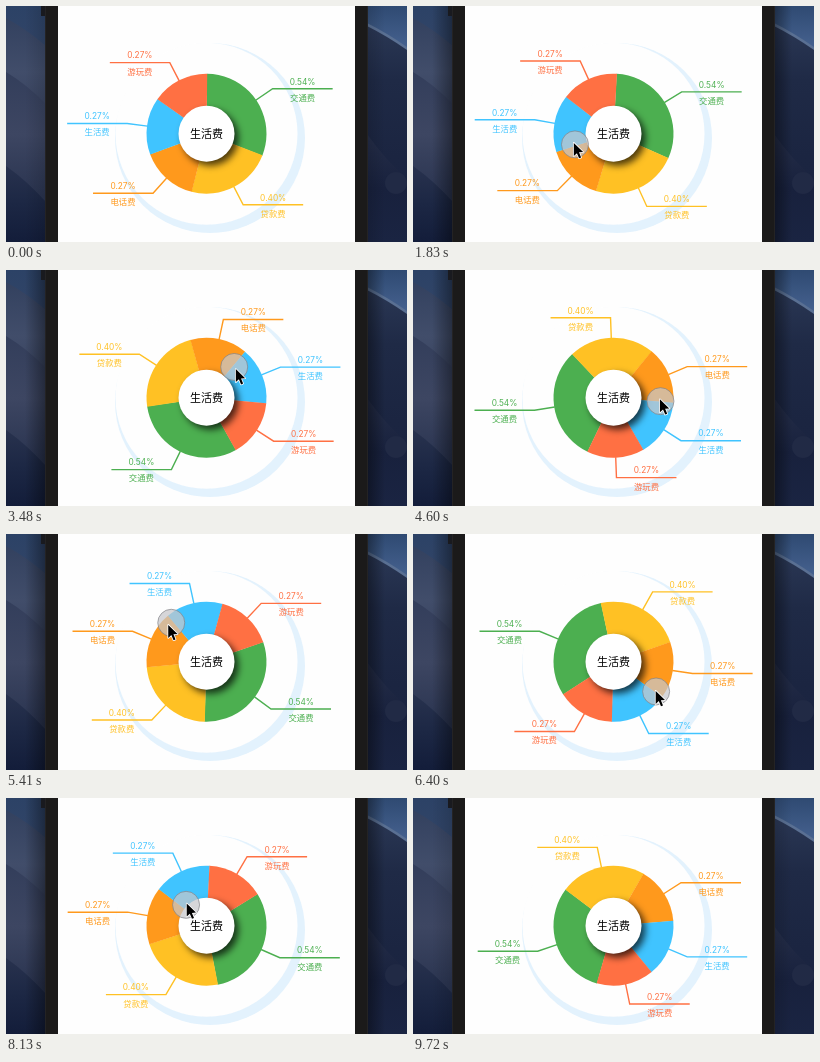
These frames come from a looping animation (401x236 px, 9780 ms). An HTML page with a canvas:

```html
<!DOCTYPE html>
<html lang="zh">
<head>
<meta charset="utf-8">
<style>
  html, body { margin: 0; width: 100%; height: 100%; overflow: hidden; background: #1b2338; }
  canvas { display: block; width: 401px; height: 236px; }
</style>
</head>
<body>
<canvas id="stage" width="401" height="236"></canvas>
<script>
const ctx = document.getElementById('stage').getContext('2d');
const W = 401, H = 236, LOOP = 9780;
const CX = 200.5, CY = 127.7, RADIUS = 60, ELBOW = 80, ARM = 60;
const RAD = Math.PI / 180;
const PRESS = 1530, RELEASE = 8820, BLUR = 9720;
const CJK = '"Noto Sans CJK SC", "Noto Sans CJK", sans-serif';

const slices = [
  { name: '交通费', share: 4, label: '0.54%', color: '#4caf50' },
  { name: '贷款费', share: 3, label: '0.40%', color: '#ffc124' },
  { name: '电话费', share: 2, label: '0.27%', color: '#ff991c' },
  { name: '生活费', share: 2, label: '0.27%', color: '#40c4ff' },
  { name: '游玩费', share: 2, label: '0.27%', color: '#ff7043' }
];
const total = slices.reduce((sum, s) => sum + s.share, 0);

// Time in ms, wheel angle in degrees
const spin = [
  [0, 270.4], [1775, 270.4], [2630, 568], [3480, 780.4], [3770, 838], [3950, 852],
  [4315, 852], [5410, 701], [6280, 523], [6400, 507], [6810, 497],
  [7045, 497], [8130, 688], [8820, 826], [LOOP, 826]
];
// Time in ms, distance of the finger from the centre
const reach = [
  [0, 40], [1775, 40], [2630, 38.6], [3480, 41.4], [3950, 46], [4315, 46],
  [5410, 52.5], [6400, 52], [6810, 50], [7045, 50], [8130, 29.2], [8820, 39], [LOOP, 39]
];
// Time in ms, degrees by which the finger trails the wheel angle
const grip = [
  [0, 108.6], [3480, 108.6], [5410, 113], [6400, 112], [8130, 102.6], [8820, 109.5], [LOOP, 109.5]
];

// Monotone cubic interpolation through key points
function curve(keys, t) {
  const last = keys.length - 2;
  let i = 0;
  while (i < last && t >= keys[i + 1][0]) i++;
  const slope = k => (keys[k + 1][1] - keys[k][1]) / (keys[k + 1][0] - keys[k][0]);
  const tangent = k => {
    if (k < 1 || k > last) return 0;
    const a = slope(k - 1), b = slope(k);
    return a * b <= 0 ? 0 : 2 * a * b / (a + b);
  };
  const [t0, v0] = keys[i], [t1, v1] = keys[i + 1];
  const d = t1 - t0, u = Math.min(1, (t - t0) / d), w = 1 - u;
  return v0 * (1 + 2 * u) * w * w + v1 * u * u * (3 - 2 * u)
    + d * u * w * (tangent(i) * w - tangent(i + 1) * u);
}

const polar = (deg, r) => [CX + r * Math.cos(deg * RAD), CY + r * Math.sin(deg * RAD)];
const finger = t => polar(curve(spin, t) - curve(grip, t), curve(reach, t));
const mix = (a, b, u) => [a[0] + (b[0] - a[0]) * u, a[1] + (b[1] - a[1]) * u];
const ease = u => u * u * (3 - 2 * u);

function pointer(t) {
  const rest = [307, 179];
  if (t < 710 || t >= 9400) return null;
  if (t < 770) return [323, 201];
  const [x, y] = finger(t + 20);
  const held = [x - 1.5, y - 1.5];
  if (t < PRESS) return mix(rest, held, ease(Math.max(0, (t - 945) / (PRESS - 945))));
  if (t < 8935) return held;
  const u = (t - 8935) / 465;
  return mix(held, [363, 238], u * (0.6 + 0.4 * u));
}

function disc(x, y, r, fill) {
  ctx.beginPath();
  ctx.arc(x, y, r, 0, 2 * Math.PI);
  ctx.fillStyle = fill;
  ctx.fill();
}

function rect(x, y, w, h, fill) {
  ctx.fillStyle = fill;
  ctx.fillRect(x, y, w, h);
}

function gradient(x0, y0, x1, y1, stops) {
  const g = ctx.createLinearGradient(x0, y0, x1, y1);
  stops.forEach(([at, color]) => g.addColorStop(at, color));
  return g;
}

// Everything below a bent edge
function dune(x0, y0, x1, y1, bend, fill) {
  ctx.beginPath();
  ctx.moveTo(x0, y0);
  ctx.quadraticCurveTo((x0 + x1) / 2, (y0 + y1) / 2 + bend, x1, y1);
  ctx.lineTo(x1, H);
  ctx.lineTo(x0, H);
  ctx.fillStyle = fill;
  ctx.fill();
}

function drawDesktop(active) {
  rect(0, 0, 40, H, gradient(0, 0, 0, 60, [[0, '#2c4266'], [1, '#344668']]));
  dune(0, 12, 40, 40, -3, gradient(0, 12, 0, 120, [[0, '#33415f'], [0.5, '#414d6a'], [1, '#353f5a']]));
  dune(0, 66, 40, 98, -4, gradient(0, 66, 0, 190, [[0, '#333e5b'], [0.5, '#3d4662'], [1, '#2a3450']]));
  dune(0, 160, 40, 196, -4, gradient(0, 160, 0, H, [[0, '#28324e'], [0.5, '#1c2744'], [1, '#131d3a']]));

  rect(361, 0, 40, H, gradient(0, 0, 0, 45, [[0, '#2f4a72'], [1, '#476391']]));
  dune(361, 17, W, 41, -2, '#5a7093');
  dune(361, 20, W, 44, -2, gradient(0, 20, 0, H,
    [[0, '#2a3754'], [0.25, '#1f2a46'], [0.6, '#1b2541'], [1, '#1a2340']]));
  dune(361, 128, W, 172, 6, gradient(0, 128, 0, H, [[0, '#252e49'], [0.5, '#18213d'], [1, '#1a2442']]));
  disc(390, 177, 11, '#212a45');

  const shade = `rgba(0,0,0,${active ? 0.38 : 0.14})`;
  rect(19, 0, 20, H, gradient(39, 0, 19, 0, [[0, shade], [1, 'rgba(0,0,0,0)']]));
  rect(362, 0, 17, H, gradient(362, 0, 379, 0, [[0, shade], [1, 'rgba(0,0,0,0)']]));
}

function drawPhone() {
  rect(35, 0, 5, 10, '#191a1f');
  rect(39, 0, 323, H, '#242324');
  rect(40, 0, 321, H, '#1b1a1a');
  rect(52, 0, 297, H, '#fefefe');
  disc(204, 132, 95, '#e3f2fd');
  disc(CX, CY, 91, '#fefefe');
}

function drawLabel(slice, mid) {
  const [sx, sy] = polar(mid, RADIUS - 0.5);
  const [ex, ey] = polar(mid, ELBOW);
  const side = ex < CX ? -1 : 1;
  ctx.beginPath();
  ctx.moveTo(sx, sy);
  ctx.lineTo(ex, ey);
  ctx.lineTo(ex + side * ARM, ey);
  ctx.strokeStyle = ctx.fillStyle = slice.color;
  ctx.lineWidth = 1.4;
  ctx.stroke();
  const x = ex + side * ARM / 2;
  ctx.font = '8.3px Inter, Roboto, sans-serif';
  ctx.fillText(slice.label, x, ey - 4.2);
  ctx.font = '8.4px ' + CJK;
  ctx.fillText(slice.name, x, ey + 11.9);
}

function drawWheel(start) {
  let angle = start;
  const mids = slices.map(slice => {
    const sweep = slice.share / total * 360;
    ctx.beginPath();
    ctx.moveTo(CX, CY);
    ctx.arc(CX, CY, RADIUS, angle * RAD, (angle + sweep + 0.3) * RAD);
    ctx.fillStyle = slice.color;
    ctx.fill();
    angle += sweep;
    return angle - sweep / 2;
  });
  ctx.textAlign = 'center';
  slices.forEach((slice, i) => drawLabel(slice, mids[i]));

  ctx.save();
  ctx.shadowColor = 'rgba(0,0,0,0.7)';
  ctx.shadowBlur = 7;
  ctx.shadowOffsetX = ctx.shadowOffsetY = 4;
  disc(CX, CY, 28, '#fff');
  ctx.restore();
  ctx.fillStyle = '#000';
  ctx.font = '500 11px ' + CJK;
  ctx.fillText('生活费', CX, CY + 4.4);
}

function drawTouch([x, y]) {
  disc(x, y, 13.5, 'rgba(198,198,202,0.72)');
  ctx.strokeStyle = 'rgba(125,125,130,0.65)';
  ctx.lineWidth = 1;
  ctx.stroke();
}

function drawArrow([x, y]) {
  const shape = [[0.7, 1.5], [0.7, 14.5], [3.8, 11.7], [6, 16.8], [8, 16], [5.9, 10.9], [10, 10.6]];
  ctx.beginPath();
  shape.forEach(([dx, dy]) => ctx.lineTo(x + dx, y + dy));
  ctx.closePath();
  ctx.lineJoin = 'round';
  ctx.strokeStyle = '#fff';
  ctx.lineWidth = 1.6;
  ctx.stroke();
  ctx.fillStyle = '#000';
  ctx.fill();
}

function draw(t) {
  drawDesktop(t >= PRESS && t < BLUR);
  drawPhone();
  ctx.lineJoin = 'miter';
  drawWheel(curve(spin, t));
  if (t >= PRESS && t < RELEASE) drawTouch(finger(t));
  const tip = pointer(t);
  if (tip) drawArrow(tip);
}

const began = performance.now();
function tick() {
  draw((performance.now() - began) % LOOP);
  requestAnimationFrame(tick);
}
tick();
</script>
</body>
</html>
```
